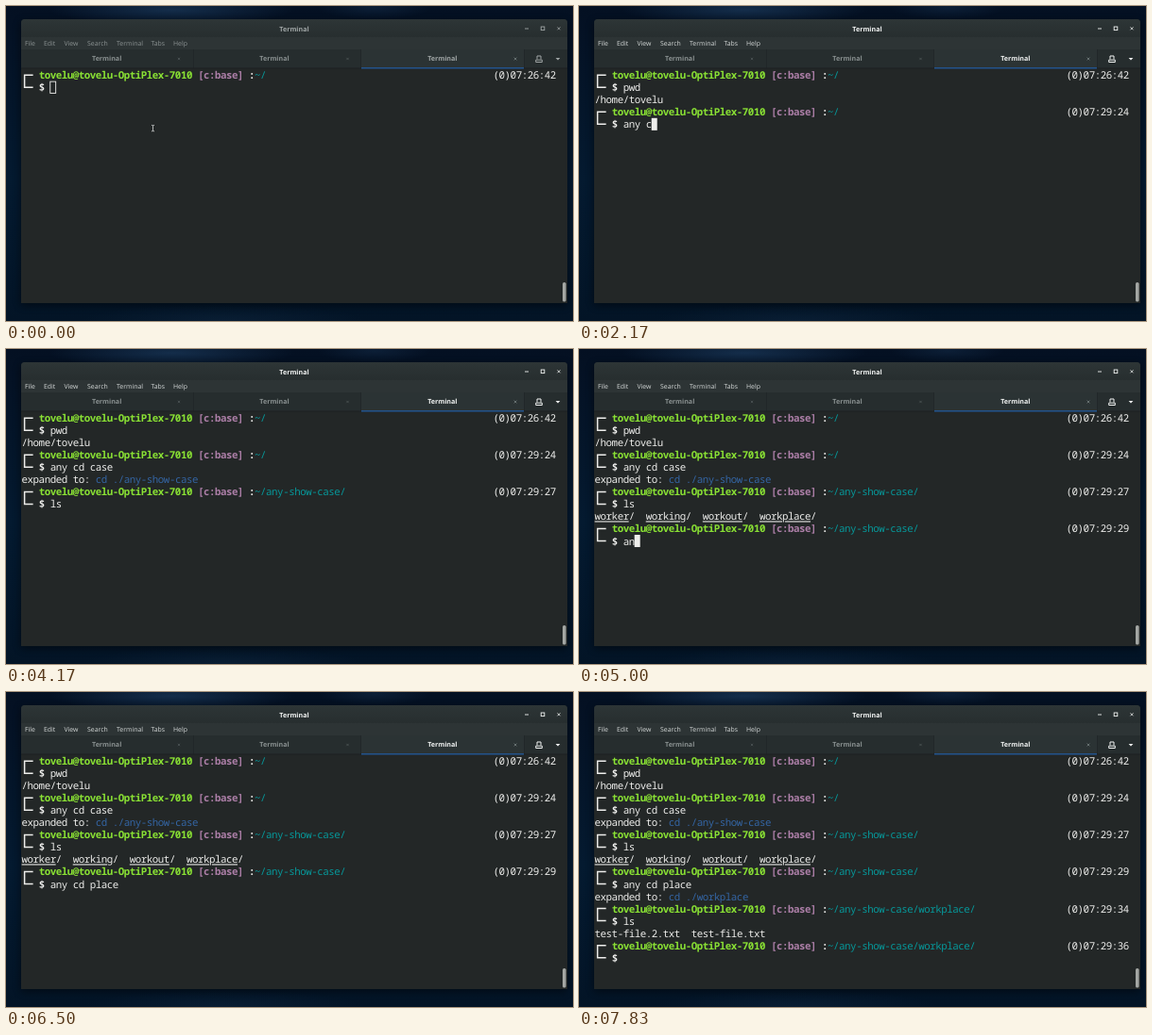
Write an HTML page that moves like this. It is 600 px wide and 334 px high and loops after 8000 ms.

```html
<!DOCTYPE html>
<html lang="en">
<head>
<meta charset="utf-8">
<title>Terminal</title>
<style>
  html, body { margin: 0; width: 100%; height: 100%; overflow: hidden; background: #03101f; }
  svg { display: block; width: 100vw; height: 100vh; }
  text { white-space: pre; text-rendering: geometricPrecision; }
  .ui { font: 6.9px "Open Sans", "Noto Sans", sans-serif; }
  .ui .title { font-weight: 700; font-size: 7.1px; text-anchor: middle; }
  .term { font: 10.8px "Noto Sans Mono", "DejaVu Sans Mono", monospace; letter-spacing: -.468px; fill: #eeeeec; }
  .b { font-weight: 700; }
  .user { fill: #8ae234; }
  .env { fill: #ad7fa8; }
  .path { fill: #06989a; }
  .hint { fill: #3465a4; }
  .u { text-decoration: underline; }
</style>
</head>
<body>
<svg id="stage" viewBox="0 0 600 334">
  <defs>
    <linearGradient id="sky" x2="0" y2="1">
      <stop offset="0" stop-color="#041022"/>
      <stop offset=".55" stop-color="#041a30"/>
      <stop offset="1" stop-color="#031426"/>
    </linearGradient>
    <radialGradient id="glow">
      <stop offset="0" stop-color="#1b3a5c" stop-opacity=".7"/>
      <stop offset="1" stop-color="#1b3a5c" stop-opacity="0"/>
    </radialGradient>
    <linearGradient id="bar" x2="0" y2="1">
      <stop offset="0" stop-color="#2d3536"/>
      <stop offset="1" stop-color="#272e2f"/>
    </linearGradient>
    <filter id="blur" x="-10%" y="-10%" width="120%" height="120%"><feGaussianBlur stdDeviation="4"/></filter>
  </defs>
  <rect width="600" height="334" fill="url(#sky)"/>
  <ellipse cx="175" cy="4" rx="130" ry="16" fill="url(#glow)"/>
  <ellipse cx="390" cy="2" rx="60" ry="12" fill="url(#glow)" opacity=".5"/>
  <ellipse cx="230" cy="334" rx="150" ry="18" fill="url(#glow)" opacity=".35"/>
  <rect x="15" y="16" width="580" height="302" rx="4" fill="#000" opacity=".45" filter="url(#blur)"/>

  <path d="M16 315V18q0-4 4-4H590q4 0 4 4V315Z" fill="#232727"/>
  <path d="M16 33V18q0-4 4-4H590q4 0 4 4V33Z" fill="url(#bar)"/>
  <rect x="16" y="33" width="578" height="13" fill="#2d3435"/>
  <rect x="16" y="46" width="578" height="20" fill="#262d2e"/>
  <rect x="376" y="46" width="172" height="20" fill="#2b3334"/>
  <path d="M198.5 46v20M375.5 46v20M548.5 46v20" stroke="#202627" stroke-width=".7"/>
  <rect x="16" y="65.5" width="578" height="1" fill="#1c2122"/>
  <rect x="376" y="65" width="172" height="1.6" fill="#245289"/>
  <rect x="589" y="293" width="3.6" height="20.5" rx="1.6" fill="#a3a6a3"/>
  <g id="chrome" class="ui"></g>
  <g id="term" class="term"></g>
</svg>
<script>
const LOOP = 8000;
const COL = 6.012, ROW = 13.03, LEFT = 16.6, TOP = 66.7;
const chrome = document.getElementById('chrome');
const term = document.getElementById('term');
const USER = 'tovelu';

const colX = col => LEFT + col * COL;
const rowY = row => TOP + row * ROW;

function add(parent, markup) {
  parent.insertAdjacentHTML('beforeend', markup);
  return parent.lastElementChild;
}

// Visible from one time to another, with hard changes.
function show(el, from, to = LOOP) {
  const key = (time, opacity) => ({ offset: time / LOOP, opacity, easing: 'step-end' });
  const keys = [key(from, 1), key(to, to < LOOP ? 0 : 1)];
  if (from > 0) keys.unshift(key(0, 0));
  if (to < LOOP) keys.push(key(LOOP, 0));
  el.animate(keys, { duration: LOOP, iterations: Infinity });
}

const text = (row, col, str, cls = '') =>
  `<text x="${colX(col)}" y="${rowY(row) + 10.5}" class="${cls}">${str}</text>`;

function windowControls(from, to, ink, menuInk) {
  const menu = [['File', 20], ['Edit', 40], ['View', 61.5], ['Search', 86],
                ['Terminal', 117], ['Tabs', 153.5], ['Help', 177]];
  const label = (x, y, fill) => `<text class="title" x="${x}" y="${y}" fill="${fill}">Terminal</text>`;
  const cross = (x, y, r, stroke) =>
    `<path d="M${x - r} ${y - r}l${2 * r} ${2 * r}m0 ${-2 * r}l${-2 * r} ${2 * r}" stroke="${stroke}" stroke-width=".8"/>`;
  show(add(chrome, `<g>
    ${label(305, 26.6, ink)}
    ${menu.map(([name, x]) => `<text x="${x}" y="42.2" fill="${menuInk}">${name}</text>`).join('')}
    ${label(106.7, 58.3, '#899090')}${label(284, 58.3, '#899090')}${label(461.8, 58.3, ink)}
    ${cross(183, 56, 1.2, '#4e5657')}${cross(361.5, 56, 1.2, '#4e5657')}${cross(539, 56, 1.4, '#778081')}
    <path d="M549 24h4" stroke="${ink}" stroke-width=".9"/>
    <rect x="566.2" y="22" width="3.6" height="3.6" fill="none" stroke="${ink}" stroke-width=".9"/>
    ${cross(585, 23.8, 1.5, ink)}
    <path d="M562 56.5v-3.5h4v3.5M560.7 57.2h6.6v2.3h-6.6Z" fill="none" stroke="${ink}"/>
    <path d="M581.6 55h4.8l-2.4 2.6Z" fill="${ink}"/>
  </g>`), from, to);
}

function cursor(row, col, from, to) {
  show(add(term, `<rect x="${colX(col)}" y="${rowY(row)}" width="${COL}" height="${ROW}"/>`), from, to);
}

function prompt(row, time, path, clock) {
  const host = `${USER}@${USER}-OptiPlex-7010`;
  show(add(term, `<g>
    <path d="M${colX(2)} ${rowY(row + .5)}H${colX(.5)}V${rowY(row + 1.5)}H${colX(2)}"
      fill="none" stroke="#eeeeec" stroke-width="1.5"/>
    ${text(row, 3, host, 'b user')}${text(row, 31, '[c:base]', 'b env')}
    ${text(row, 40, ':', 'b')}${text(row, 41, path, 'path')}
    ${text(row, 83, `(0)${clock}`)}${text(row + 1, 3, '$', 'b')}
  </g>`), time);
}

// Each step gives a time and the characters it adds; the cursor follows and goes at end.
function type(row, end, steps) {
  let col = 5;
  steps.forEach(([time, chars], i) => {
    if (chars) show(add(term, text(row, col, chars)), time);
    col += chars.length;
    cursor(row, col, time, i + 1 < steps.length ? steps[i + 1][0] : end);
  });
}

function print(row, time, ...parts) {
  show(add(term, `<g>${parts.map(([col, str, cls]) => text(row, col, str, cls)).join('')}</g>`), time);
}

windowControls(0, 170, '#a0a6a6', '#8c9393');
windowControls(170, LOOP, '#f2f4f3', '#d6dad9');

// Hollow cursor and pointer before typing starts.
show(add(term, `<rect x="${colX(5) + .1}" y="${rowY(1) + .4}" width="5.9" height="12.3"
  fill="none" stroke="#eeeeec" stroke-width=".9"/>`), 0, 170);
cursor(1, 5, 170, 500);
show(add(term, `<path d="M154 126.3q1.5 0 1.5 1v4.6q0 1-1.5 1m3-6.6q-1.5 0-1.5 1m0 4.6q0 1 1.5 1"
  fill="none" stroke="#d8dada" stroke-width=".8"/>`), 0, 830);

prompt(0, 0, '~/', '07:26:42');
type(1, 1330, [[830, 'p'], [1000, 'w'], [1170, 'd']]);
print(2, 1500, [0, `/home/${USER}`]);

prompt(3, 1500, '~/', '07:29:24');
type(4, 3000, [[1670, ''], [1830, 'a'], [2000, 'ny'], [2170, ' c'], [2330, 'd'],
               [2500, ' c'], [2670, 'a'], [2830, 'se']]);
print(5, 3330, [0, 'expanded to:'], [13, 'cd ./any-show-case', 'hint']);

prompt(6, 3330, '~/any-show-case/', '07:29:27');
type(7, 4170, [[3330, ''], [3670, 'l'], [3830, 's']]);
const folders = [[0, 'worker'], [9, 'working'], [19, 'workout'], [29, 'workplace']];
print(8, 4330, ...folders.flatMap(([col, name]) => [[col, name, 'u'], [col + name.length, '/']]));

prompt(9, 4330, '~/any-show-case/', '07:29:29');
type(10, 6500, [[4670, ''], [4830, 'a'], [5000, 'n'], [5170, 'y'], [5330, ' c'], [5500, 'd'],
                [5670, ' '], [5830, 'p'], [6000, 'la'], [6170, 'ce']]);
print(11, 6670, [0, 'expanded to:'], [13, 'cd ./workplace', 'hint']);

prompt(12, 6830, '~/any-show-case/workplace/', '07:29:34');
type(13, 7670, [[7000, ''], [7330, 'ls']]);
print(14, 7830, [0, 'test-file.2.txt'], [17, 'test-file.txt']);

prompt(15, 7830, '~/any-show-case/workplace/', '07:29:36');
</script>
</body>
</html>
```
